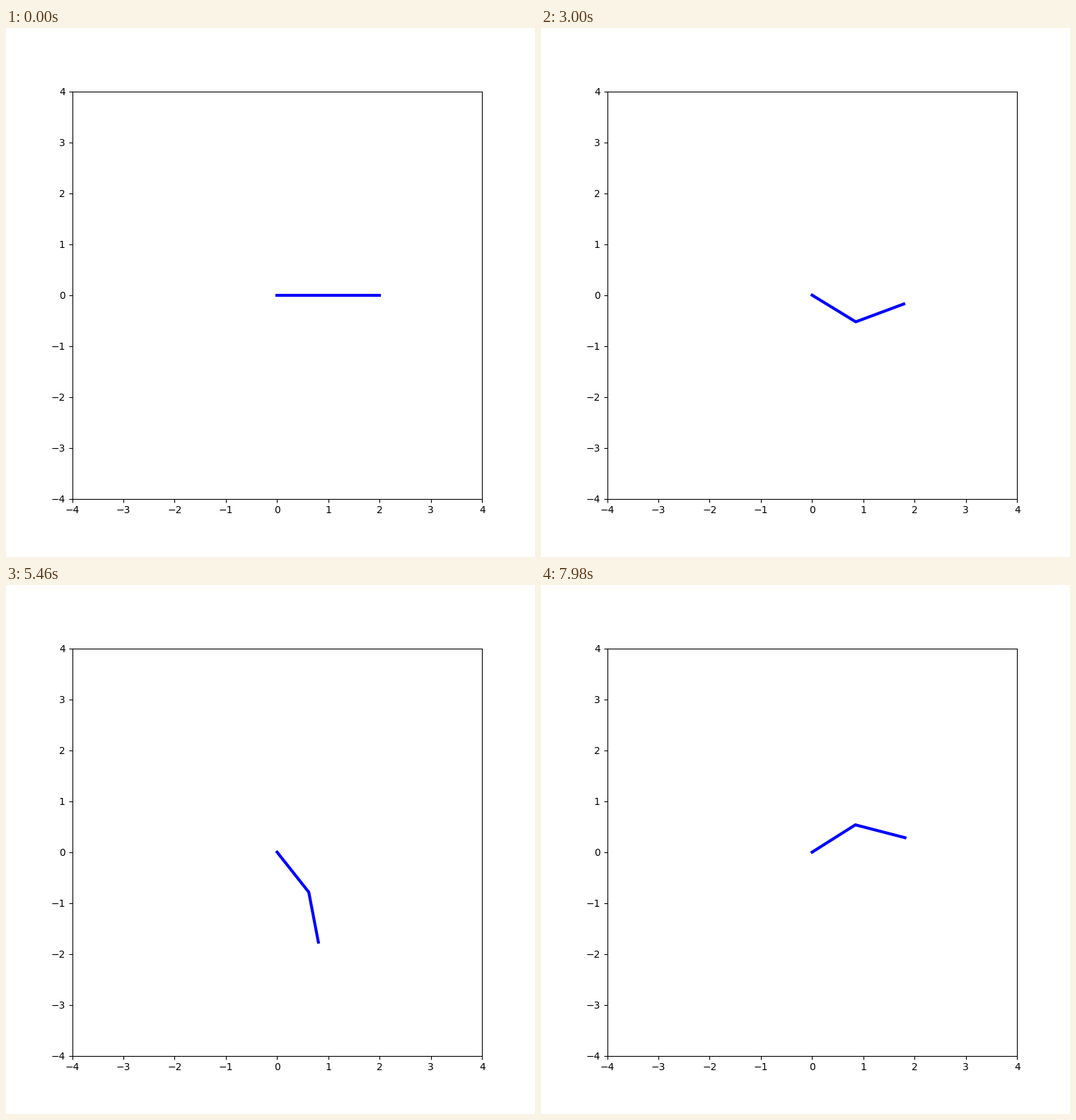
These frames come from a looping animation (748x748 px, 8 s). A matplotlib script:

```python
import numpy as np
import matplotlib.pyplot as plt
from matplotlib.animation import FuncAnimation

TICK_MS = 20      # animation clock
HOLD = 3          # clock ticks per pose
LOOP_MS = 8000
STEP = 0.04       # model time per pose


def arm_points(t):
    """Base, elbow and tip of a two-link arm with unit links."""
    shoulder = np.cos(t) - np.exp(-t)
    elbow = np.sin(t)
    angles = np.array([shoulder, shoulder + elbow])
    xs = np.concatenate([[0], np.cumsum(np.cos(angles))])
    ys = np.concatenate([[0], np.cumsum(np.sin(angles))])
    return xs, ys


fig, ax = plt.subplots(figsize=(7.48, 7.48), dpi=100)
ax.set_xlim(-4, 4)
ax.set_ylim(-4, 4)
ax.set_xticks(range(-4, 5))
ax.set_yticks(range(-4, 5))
arm, = ax.plot([], [], color="blue", lw=3)


def update(tick):
    arm.set_data(*arm_points(STEP * (tick // HOLD)))
    return arm,


anim = FuncAnimation(fig, update, frames=LOOP_MS // TICK_MS,
                     interval=TICK_MS, repeat=True, repeat_delay=0)
plt.show()
```
